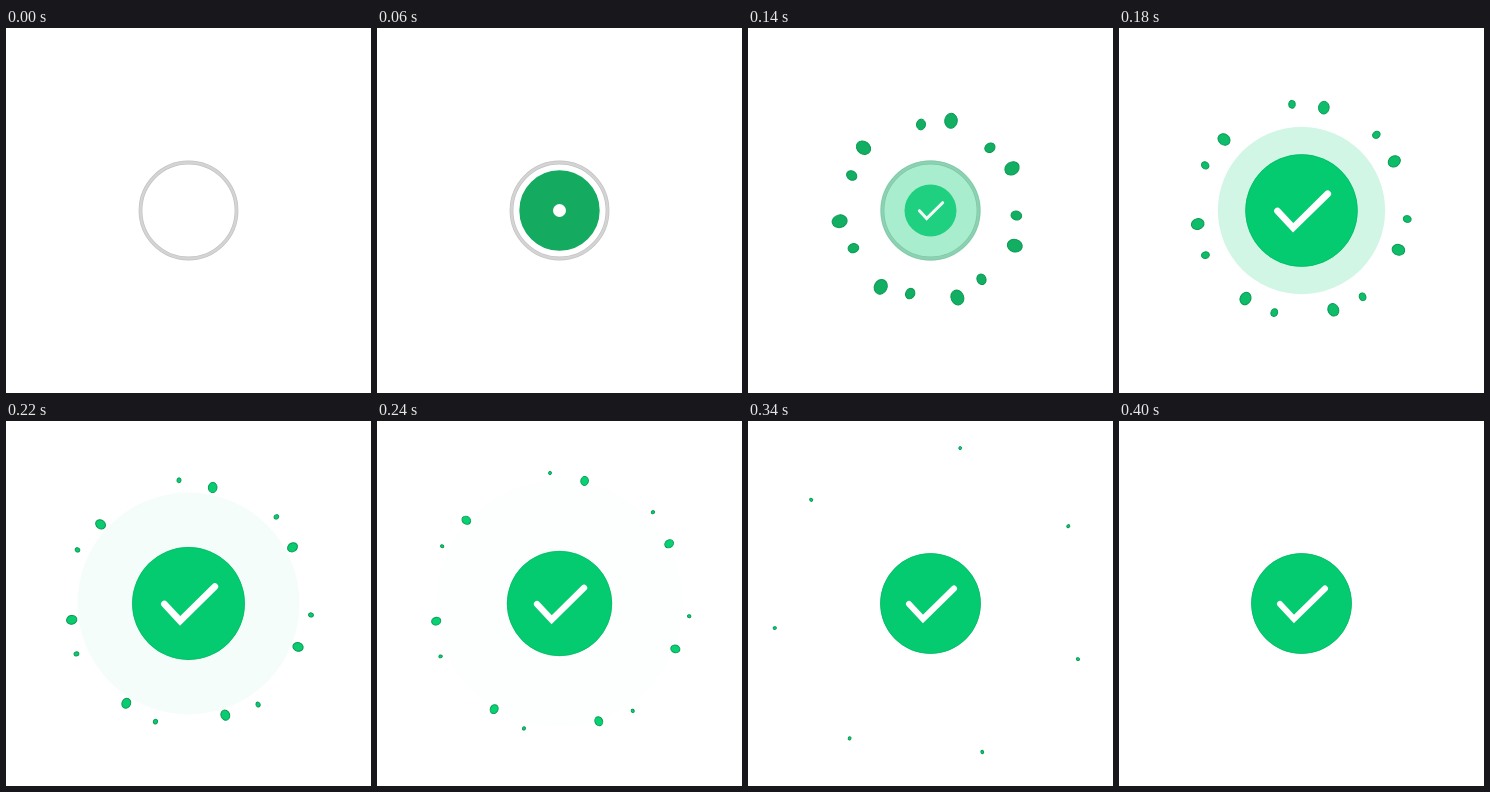
These frames come from a looping animation (365 by 365 pixels, 420 ms). An HTML page with a canvas:

```html
<!DOCTYPE html>
<html>
<head>
<meta charset="utf-8">
<title>Success burst</title>
<style>
  html, body { margin: 0; overflow: hidden; background: #fff; }
  canvas { display: block; }
</style>
</head>
<body>
<canvas id="stage" width="365" height="365"></canvas>
<script>
const ctx = document.getElementById('stage').getContext('2d');
const LOOP = 420, STEP = 20, SIZE = 365, CENTER = SIZE / 2;
const GREEN = '4,203,112', EDGE = '#0a9a54';

// Progress of t from start to end, clamped to 0..1
const span = (t, start, end) => Math.min(1, Math.max(0, (t - start) / (end - start)));
const easeInOut = p => (1 - Math.cos(Math.PI * p)) / 2;
const easeOut = p => Math.sin(Math.PI / 2 * p);

function disc(radius, color) {
  ctx.beginPath();
  ctx.arc(CENTER, CENTER, Math.max(0, radius), 0, 7);
  ctx.fillStyle = color;
  ctx.fill();
}

function ring(outer, inner, color) {
  ctx.beginPath();
  ctx.arc(CENTER, CENTER, (outer + inner) / 2, 0, 7);
  ctx.lineWidth = outer - inner;
  ctx.strokeStyle = color;
  ctx.stroke();
}

function drawBurst(t) {
  const p = span(t, 40, 120);
  if (p > 0 && t <= 120) ring(105 * easeOut(p), 104 * p * p, '#14aa60');
}

function drawButton() {
  ring(49.9, 46.1, '#c2c2c2');
  ring(49.2, 46.8, '#d4d4d4');
}

function drawHalo(t) {
  const p = (t - 100) / 120;
  const radius = 23 + 88 * p - 2.3 * Math.sin(2 * Math.PI * p);
  const alpha = .5 * (1 - easeInOut(span(t, 70, 256)));
  disc(radius, `rgba(${GREEN},${alpha})`);
}

// Seven copies of a dot, 50 degrees apart, flying outwards
function dots(x, y, size, color) {
  if (size <= 0) return;
  ctx.fillStyle = color;
  ctx.strokeStyle = EDGE;
  ctx.lineWidth = 1;
  for (let i = 0; i < 7; i++) {
    ctx.save();
    ctx.translate(CENTER, CENTER - .5);
    ctx.rotate(50 * i * Math.PI / 180);
    ctx.beginPath();
    ctx.ellipse(x, -y, size * .9, size * 1.08, .1, 0, 7);
    ctx.fill();
    ctx.stroke();
    ctx.restore();
  }
}

function drawDots(t) {
  if (t < 120 || t >= 400) return;
  const age = t - 140, k = span(t, 140, 250);
  const color = `rgb(${18 - 12 * k},${175 + 39 * k},${99 + 18 * k})`;
  dots(20.5 + .046 * age, 89.2 + .3286 * age, 7 - .0275 * age, color);
  dots(-9.5, 85.5 + .545 * age - .001 * age * age, 5 - .034 * age, color);
}

function drawCheck(scale, alpha) {
  ctx.save();
  ctx.translate(CENTER, CENTER);
  ctx.scale(scale, scale);
  ctx.beginPath();
  ctx.moveTo(-21.5, .5);
  ctx.lineTo(-7.5, 15.5);
  ctx.lineTo(23.5, -15);
  ctx.lineWidth = 6;
  ctx.lineCap = 'round';
  ctx.strokeStyle = `rgba(255,255,255,${alpha})`;
  ctx.stroke();
  ctx.restore();
}

// The badge grows past its final size, then settles
function drawBadge(t) {
  const radius = 60.5 * span(t, 78, 185) ** 1.55 - 10.2 * easeInOut(span(t, 185, 265));
  const alpha = span(t, 72, 153);
  if (radius <= 0) return;
  disc(radius, `rgba(${GREEN},${alpha})`);
  if (alpha === 1) ring(radius, radius - .6, '#06b766');
  if (t >= 120) drawCheck(radius / 50.3, Math.min(1, alpha + .1));
}

function draw(t) {
  ctx.clearRect(0, 0, SIZE, SIZE);
  drawBurst(t);
  drawButton();
  if (t >= 60) drawHalo(t);
  drawDots(t);
  drawBadge(t);
}

function tick() {
  const t = Math.floor(performance.now() % LOOP / STEP) * STEP;
  draw(t < 40 ? 0 : t);
  requestAnimationFrame(tick);
}
tick();
</script>
</body>
</html>
```
